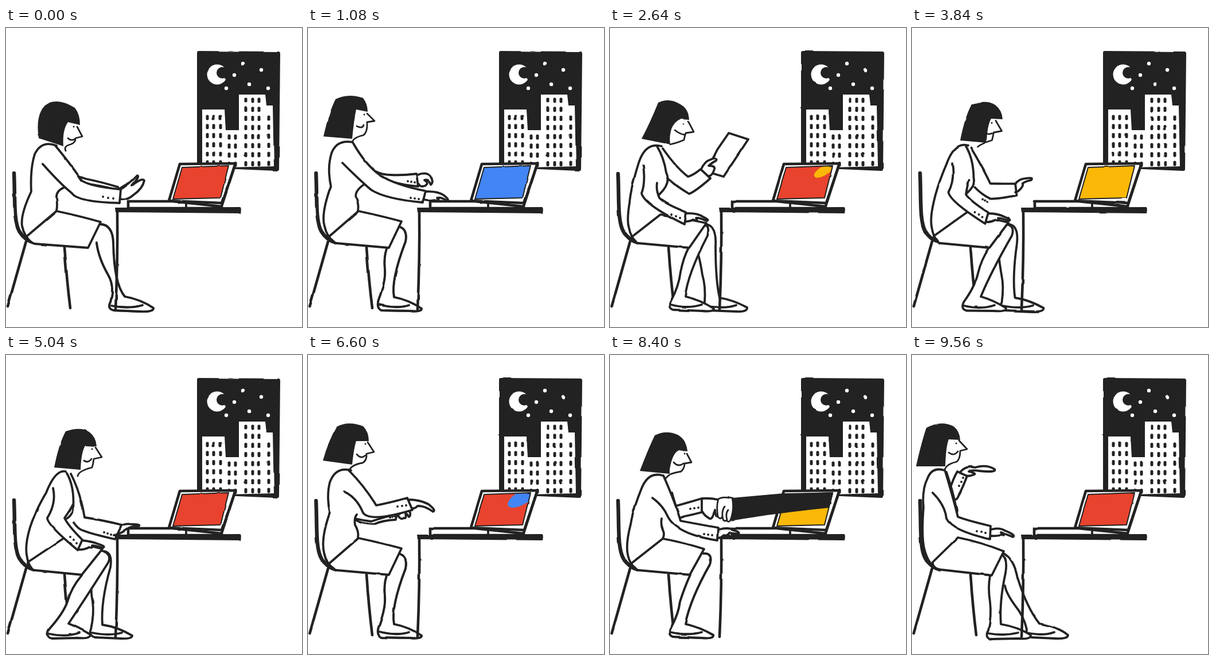
These frames come from a looping animation (516 by 521 pixels, 9600 ms). An HTML page:

```html
<!DOCTYPE html>
<html lang="en">
<head>
<meta charset="utf-8">
<title>Working late</title>
<style>
html, body { margin: 0; width: 100%; height: 100%; overflow: hidden; background: #fff; }
svg { display: block; width: 516px; height: 521px; }
.line { fill: none; stroke: #222; stroke-width: 3.8; stroke-linecap: round; stroke-linejoin: round; }
.line.fine { stroke-width: 2.8; }
.line.bold { stroke-width: 4.6; }
.line.heavy { stroke-width: 6.5; }
.white { fill: #fff; }
.ink { fill: #222; }
</style>
</head>
<body>
<svg viewBox="0 0 516 521">
  <defs>
    <filter id="rough" filterUnits="userSpaceOnUse" x="0" y="0" width="516" height="521" color-interpolation-filters="sRGB">
      <feTurbulence id="noise" type="fractalNoise" baseFrequency=".035" numOctaves="1"/>
      <feDisplacementMap in="SourceGraphic" scale="2.4" xChannelSelector="R" yChannelSelector="G"/>
    </filter>
    <clipPath id="screen"><path d="M307 243L388 240L374 296L291 298Z"/></clipPath>
    <clipPath id="reach"><path d="M0 0H389V240L374 297H0Z"/></clipPath>
  </defs>
  <g filter="url(#rough)">
    <path class="ink" d="M336 40L475 41Q478 41 478 45L476 246Q476 249 473 249L333 243L333 43Q333 40 336 40Z"/>
    <path class="white" d="M342 142H381L383 178H406V116H452L454 135H465L467 241L342 244Z"/>
    <circle class="white" cx="368" cy="81" r="17.5"/>
    <circle class="ink" cx="377" cy="78" r="10"/>
    <path class="ink" d="M377 69L386 68V94L381 87Z"/>
    <g id="dots"></g>
    <path class="line heavy" d="M14 253C16 300 13 335 23 354Q32 369 48 374"/>
    <path class="line bold" d="M35 372Q20 425 3 485M102 382Q106 440 112 488"/>
    <path id="backLeg" class="line white"/>
    <path id="frontLeg" class="line white"/>
    <path id="skirt" class="line white"/>
    <path class="line bold" d="M194 320Q195 400 191 491"/>
    <path class="line bold white" d="M213 314V302L290 302L376 311V314Z"/>
    <path class="ink" d="M190 313L408 312Q411 313 409 323L191 321Z"/>
    <path class="line" d="M314 305V314"/>
    <path class="line bold white" d="M303 237L400 236L377 305L284 301Z"/>
    <path class="line bold" d="M400 236L376 310"/>
    <g clip-path="url(#screen)">
      <rect id="oldColor" x="280" y="235" width="120" height="70"/>
      <ellipse id="newColor" transform="translate(371 250) rotate(-30)"/>
    </g>
    <path class="line" style="stroke-width:2" d="M307 243L388 240L374 296L291 298Z"/>
    <path id="paper" class="line white" d="M207 183L241 194L198 259L168 250L187 212Z"/>
    <path id="backArm" class="line white"/>
    <path id="torso" class="line"/>
    <path id="hair" class="ink"/>
    <path id="face" class="line fine"/>
    <path id="frontArm" class="line white"/>
    <g clip-path="url(#reach)">
      <g id="visitor">
        <path class="ink" d="M213 249L303 241L400 239L394 265Q300 274 210 289Z"/>
        <path class="line fine white" d="M213 250Q197 246 189 251Q185 262 188 282Q193 288 196 281Q197 292 203 288Q208 294 211 285Q217 266 213 250M196 281Q195 270 200 264M204 287Q201 276 206 270"/>
      </g>
    </g>
  </g>
</svg>
<script>
const LOOP = 9600;
const RED = '#e8432e', BLUE = '#4285f4', YELLOW = '#fbb808';
const $ = id => document.getElementById(id);

const sitLeg = 'M158 346Q174 350 170 372Q144 440 150 469Q176 474 198 489Q198 495 178 493L128 492Q118 487 124 472Q136 440 134 420Q132 400 137 385M124 482Q155 490 176 483';
const sitSkirt = 'M88 319Q130 328 163 337L141 383L50 375Q38 372 36 364Z';
const tuckedLeg = 'M163 346Q180 345 174 365Q140 425 131 469Q156 474 180 488Q181 495 160 493L110 491Q100 488 106 476Q120 450 122 430Q130 405 140 383M106 483Q135 490 160 483';
const stretchedLeg = 'M165 342Q186 343 187 375Q188 445 207 468Q235 473 257 488Q257 495 235 494L188 492Q176 489 182 478Q190 450 178 430Q161 400 158 374M184 484Q215 490 238 483';

// Key poses; a part keeps the same commands in every pose so it can be blended.
const poses = [
  { at: 0,
    hair: 'M68 135Q88 119 120 139Q129 150 129 169L108 164Q98 178 100 206L57 192Q51 152 68 135Z',
    face: 'M124 172L133 189L121 192Q122 200 112 203Q100 206 104 214M108 192Q113 197 119 194M118 172h.1',
    torso: 'M88 205Q62 195 50 220Q42 245 44 285Q25 325 28 345Q32 364 45 374M101 278Q87 284 88 296Q90 310 88 318',
    skirt: 'M88 319Q130 328 165 338L143 383L50 376Q38 372 36 363Z',
    frontLeg: stretchedLeg, backLeg: stretchedLeg,
    frontArm: 'M64 237Q95 272 115 288Q125 303 198 305L200 281Q150 277 132 266Q115 240 86 205M200 281Q215 272 229 257Q234 258 220 274Q238 260 241 266Q238 280 222 291Q212 300 201 299M169 294h.1M178 296h.1M187 297h.1',
    backArm: 'M110 250Q128 260 140 263Q165 268 195 277L198 283Q165 275 150 273Q140 272 130 268M198 280Q210 272 215 270Q222 268 220 272Q214 276 212 278Q208 282 206 284Q202 288 200 290M150 285h.1M152 287h.1M154 288h.1' },
  { at: 1080,
    hair: 'M48 124Q70 113 96 122Q104 132 104 146L84 142Q80 160 77 193L27 189Q36 148 48 124Z',
    face: 'M103 149L116 162L103 164Q104 182 96 187Q79 191 77 199M85 171Q95 176 97 169M98 151h.1',
    torso: 'M78 199Q50 194 41 218Q33 245 40 275Q22 325 29 346Q33 364 45 372M100 271Q80 284 84 296Q89 308 87 318',
    skirt: sitSkirt, frontLeg: sitLeg, backLeg: sitLeg,
    frontArm: 'M60 235Q90 265 110 282Q135 298 200 304L205 284Q150 273 125 256Q100 238 79 201M205 285Q225 284 236 291Q248 300 242 301Q232 294 225 296Q232 302 220 300Q210 302 203 300M179 296h.1M186 297h.1M193 298h.1',
    backArm: 'M118 250Q130 256 145 256Q165 257 189 254L192 276Q170 274 155 270Q145 268 135 262M191 256Q205 250 214 258Q221 268 215 273Q210 262 203 265Q212 270 204 275Q196 278 193 272M174 267h.1M180 268h.1M186 269h.1' },
  { at: 2640,
    hair: 'M84 130Q103 121 121 132Q137 140 138 159L124 158Q112 163 107 176Q103 190 105 203L55 193Q70 165 84 130Z',
    face: 'M136 162L146 181L132 183Q130 189 129 195Q118 200 104 203M113 178Q122 185 130 186M128 167h.1',
    torso: 'M90 206Q62 198 50 235Q36 280 34 305Q29 335 33 348Q36 364 45 372M82 206Q94 226 98 252Q107 270 86 290',
    skirt: 'M88 325Q130 332 168 340L138 383L50 375Q38 372 38 364Z',
    frontLeg: 'M165 344Q174 343 170 362Q135 430 131 468Q158 474 181 489Q181 495 160 493L110 491Q100 488 106 476Q120 450 123 425Q128 400 137 383M106 482Q135 490 160 482',
    backLeg: 'M168 342Q186 345 184 380Q184 440 191 470Q215 474 239 487Q240 495 220 494L170 492Q160 490 165 478Q167 450 161 430Q158 410 154 395M166 484Q200 490 220 483',
    frontArm: 'M58 240Q62 270 55 288Q60 308 130 342L133 321Q95 306 86 296Q80 282 82 270M133 323Q152 322 162 329Q175 335 168 336Q155 330 150 331Q155 337 145 334Q138 338 131 337M107 325h.1M115 328h.1M122 331h.1',
    backArm: 'M92 210Q115 243 136 259Q146 256 158 246L175 262Q150 284 138 289Q115 275 100 262M159 246Q165 232 176 229Q188 224 185 231Q176 236 172 240Q184 240 182 246Q178 258 172 258M75 290h.1M77 292h.1M79 294h.1' },
  { at: 5040,
    hair: 'M104 133Q130 124 145 134Q157 143 158 159L138 158Q131 170 130 200L84 196Q92 155 104 133Z',
    face: 'M156 161L167 178L153 181Q152 190 150 196Q126 202 125 211M136 184Q143 189 149 181M150 164h.1',
    torso: 'M104 203Q86 199 70 240Q52 270 42 300Q33 330 36 348Q38 364 45 372M106 206Q120 230 117 270Q114 280 106 285',
    skirt: 'M104 317Q135 330 168 338L132 383L50 375Q38 372 38 361Z',
    frontLeg: 'M164 340Q186 346 178 362Q138 425 109 468Q125 474 147 487Q148 495 125 493L80 494Q68 491 75 478Q100 450 107 430Q114 405 132 384M76 486Q105 492 128 484',
    backLeg: 'M172 342Q186 345 182 370Q165 430 168 470Q195 474 220 489Q220 495 200 494L155 492Q143 488 148 478Q154 450 151 430Q148 415 149 402M150 484Q180 490 202 484',
    frontArm: 'M82 232Q88 258 72 284Q72 296 125 340L133 322Q108 297 102 284Q112 270 117 260M133 323Q150 325 160 329Q176 334 168 336Q155 332 150 332Q152 337 145 335Q135 340 126 339M112 317h.1M118 322h.1M123 328h.1',
    backArm: 'M113 207Q130 240 137 283Q165 287 202 296L190 321Q150 312 135 306Q126 304 118 292M200 298Q208 293 219 295Q238 295 230 299Q218 298 213 302Q205 308 200 310Q192 314 188 314M171 309h.1M177 311h.1M183 313h.1' },
  { at: 6600,
    hair: 'M50 125Q70 114 96 124Q106 134 106 150L84 150Q80 162 77 191L26 184Q36 148 50 125Z',
    face: 'M104 152L115 169L102 172Q103 184 95 188Q76 191 71 202M85 173Q92 182 100 175M100 155h.1',
    torso: 'M75 201Q48 194 38 222Q32 245 38 275Q22 320 28 345Q32 364 45 372M85 278Q80 284 82 296Q89 308 87 318',
    skirt: sitSkirt, frontLeg: sitLeg, backLeg: sitLeg,
    frontArm: 'M63 238Q85 248 96 275Q108 292 182 270L173 249Q140 258 119 262Q98 228 72 202M175 252Q195 252 210 260Q224 271 218 273Q208 266 200 264Q190 262 190 264Q186 268 182 267M156 264h.1M164 263h.1M171 262h.1',
    backArm: 'M82 285Q95 288 110 290Q135 282 155 277L153 287Q130 288 115 295Q95 295 84 288M158 278Q168 270 177 272Q180 280 176 282Q172 276 170 276Q172 286 167 284Q162 288 157 280M143 283h.1M147 282h.1M151 281h.1' },
  { at: 8400,
    hair: 'M78 140Q98 130 118 139Q134 148 135 168L120 166Q107 172 103 207L52 202Q66 165 78 140Z',
    face: 'M134 172L142 187L130 189Q130 197 124 203Q98 207 97 216M111 187Q119 196 128 189M130 172h.1',
    torso: 'M92 210Q66 202 54 235Q40 270 36 295Q27 330 31 348Q34 364 45 372M90 285Q88 295 92 305Q96 312 92 320',
    skirt: 'M92 320Q130 327 164 338L139 383L50 375Q38 372 36 364Z',
    frontLeg: tuckedLeg, backLeg: tuckedLeg,
    frontArm: 'M74 249Q92 262 100 280Q115 312 187 323L188 301Q150 294 123 289Q113 255 93 210M189 304Q205 300 214 304Q230 310 222 312Q212 308 208 310Q204 316 198 314Q192 320 188 318M164 312h.1M171 313h.1M178 314h.1',
    backArm: 'M108 240Q113 258 115 263Q140 256 160 250L160 274Q145 278 130 281Q122 284 118 285M161 250Q175 249 188 252Q194 268 188 282Q184 285 183 270Q178 290 172 284Q165 280 161 273M140 268h.1M147 267h.1M154 266h.1' },
  { at: 9560,
    hair: 'M25 127Q50 113 72 124Q83 132 84 148L64 147Q59 160 58 194L7 194Q17 150 25 127Z',
    face: 'M82 149L96 164L84 167Q84 181 78 186Q60 190 57 200M64 170Q73 177 80 168M77 154h.1',
    torso: 'M57 201Q35 194 27 215Q17 235 20 265Q16 320 22 340Q28 362 40 370M60 204Q72 240 76 262Q82 270 76 280',
    skirt: 'M80 318Q120 326 160 342L139 384L50 374Q36 372 36 361Z',
    frontLeg: 'M152 346Q168 350 163 380Q152 430 155 469Q185 474 207 488Q208 496 185 494L138 495Q126 491 133 480Q139 455 136 430Q132 405 136 385M133 485Q160 490 185 484',
    backLeg: 'M160 346Q178 356 184 388Q200 440 222 468Q255 474 272 488Q272 495 250 494L208 492Q198 490 200 478Q195 455 180 437Q164 415 162 402M200 484Q230 490 248 483',
    frontArm: 'M36 240Q58 262 60 285Q70 306 136 321L137 298Q95 288 80 282Q72 250 58 203M138 304Q152 300 162 306Q182 314 176 317Q165 312 155 310Q165 315 155 314Q145 316 137 315M113 307h.1M121 308h.1M128 310h.1',
    backArm: 'M72 245Q66 238 66 234Q72 215 79 203L96 211Q88 232 82 243Q80 250 76 252M84 204Q94 192 110 196Q130 190 144 199Q148 205 118 202Q104 200 98 203Q122 208 96 211M89 214h.1M86 221h.1M82 228h.1' }
];
const parts = Object.keys(poses[0]).filter(key => key !== 'at');

// Each colour spreads over the screen from its top right corner.
const fills = [[-900, RED], [350, BLUE], [1500, RED], [2560, YELLOW], [4000, RED], [6480, BLUE], [7300, YELLOW], [8700, RED]];

const ease = x => { x = Math.min(1, Math.max(0, x)); return x * x * (3 - 2 * x); };
const NUMBER = /\d*\.?\d+/g;
const shape = path => path.replace(NUMBER, '');

function blend(a, b, k) {
  if (shape(a) !== shape(b)) return k < .5 ? a : b;
  const target = b.match(NUMBER);
  let i = 0;
  return a.replace(NUMBER, n => (+n + (target[i++] - n) * k).toFixed(1));
}

function drawDots() {
  let dots = '';
  const column = (x, top, count) => {
    for (let i = 0; i < count; i++) {
      dots += `<rect class="ink" x="${x - 2.5}" y="${top + i * 15.8 - 4.5}" width="5" height="9" rx="2"/>`;
    }
  };
  [351, 362, 374].forEach(x => column(x, 156, 6));
  [389, 400].forEach(x => column(x, 190, 4));
  [418, 430, 441].forEach(x => column(x, 126, 8));
  column(458, 157, 6);
  for (const [x, y] of [[413, 62], [445, 73], [398, 82], [424, 98], [384, 105], [457, 105]]) {
    dots += `<circle class="white" cx="${x}" cy="${y}" r="3.2"/>`;
  }
  $('dots').innerHTML = dots;
}

function draw(t) {
  const i = Math.min(poses.length - 2, poses.findLastIndex(p => p.at <= t));
  const from = poses[i], to = poses[i + 1];
  const k = ease(((t - from.at) / (to.at - from.at) - .25) * 2);
  for (const part of parts) $(part).setAttribute('d', blend(from[part], to[part], k));

  // The sheet travels with the far hand.
  const holding = (i === 1 && k > .5) || (i === 2 && k < .5);
  $('paper').style.display = holding ? '' : 'none';
  const [, x, y] = $('backArm').getAttribute('d').match(/.M([\d.]+) ([\d.]+)/);
  $('paper').setAttribute('transform', `translate(${x - 159} ${y - 246})`);

  const f = fills.findLastIndex(fill => fill[0] <= t);
  const radius = Math.min(220, (t - fills[f][0]) * .21);
  $('oldColor').setAttribute('fill', fills[Math.max(0, f - 1)][1]);
  $('newColor').setAttribute('fill', fills[f][1]);
  $('newColor').setAttribute('rx', radius);
  $('newColor').setAttribute('ry', radius * .45);

  const reach = ease((t - 7450) / 500) - ease((t - 8750) / 450);
  $('visitor').setAttribute('transform', `translate(${215 * (1 - reach)} 0)`);
  $('noise').setAttribute('seed', 1 + Math.floor(t / 120) % 3);
}

function tick() {
  draw(performance.now() % LOOP);
  requestAnimationFrame(tick);
}
drawDots();
tick();
</script>
</body>
</html>
```
